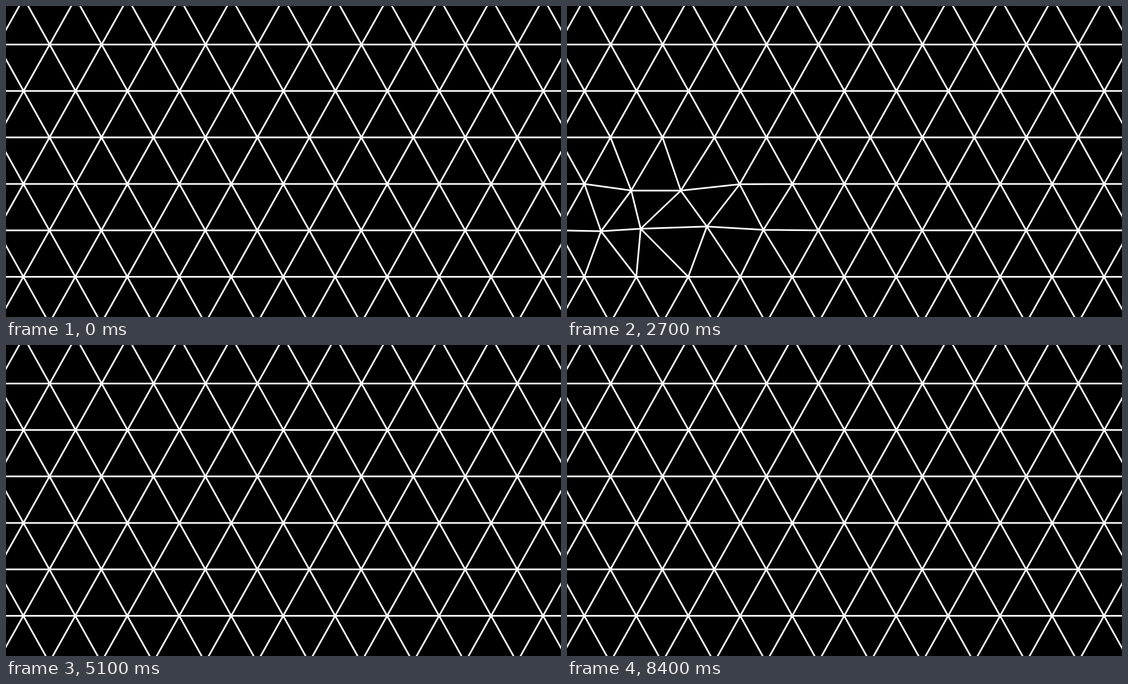
Write an HTML page with a canvas that moves like this. It is 999 px wide and 561 px high and loops after 8.5 s.

```html
<!DOCTYPE html>
<html>
<head>
<meta charset="utf-8">
<style>
  html, body { margin: 0; width: 100%; height: 100%; overflow: hidden; background: #000; }
  canvas { display: block; }
</style>
</head>
<body>
<canvas id="stage" width="999" height="561"></canvas>
<script>
const ctx = document.getElementById('stage').getContext('2d');
const LOOP = 8500, STEP = 100;
const ROWS = 6, COLS = 11;
const REACH = 80, GAIN = 50;
const RISE = 150, FALL = 800;

// An unseen pointer crosses the net in short strokes.
const strokes = [
  { from: 150, to: 750, path: [[840, 420], [650, 450], [650, 580]] },
  { from: 1150, to: 1620, path: [[330, 520], [330, 430], [380, 390], [408, 290]] },
  { from: 2120, to: 2620, path: [[350, 410], [220, 375], [110, 395]] },
  { from: 3800, to: 4280, path: [[452, 320], [465, 240], [480, 160], [440, 85]] },
  { from: 5130, to: 5350, path: [[520, 215], [570, 320], [615, 400]] },
  { from: 5930, to: 6220, path: [[690, 300], [740, 170], [720, 80]] },
  { from: 7230, to: 7520, path: [[230, 230], [110, 150], [100, 90]] }
];

// Splits a stroke into short steps of position, direction and time.
function sample({ from, to, path }) {
  const steps = [];
  for (let i = 1; i < path.length; i++) {
    const [x0, y0] = path[i - 1];
    const dx = path[i][0] - x0, dy = path[i][1] - y0;
    const length = Math.hypot(dx, dy);
    for (let s = 0; s < length; s += 4) {
      const k = s / length;
      steps.push({ x: x0 + dx * k, y: y0 + dy * k, dirX: dx / length, dirY: dy / length });
    }
  }
  steps.forEach((step, i) => step.time = from + (to - from) * i / steps.length);
  return steps;
}

// The pull a vertex gets where the pointer passes closest to it:
// along the stroke, and sideways towards it.
function pullOn(vertex, steps) {
  const distance = step => Math.hypot(step.x - vertex.x, step.y - vertex.y);
  const near = steps.reduce((a, b) => distance(b) < distance(a) ? b : a);
  const size = GAIN * Math.max(0, 1 - (distance(near) / REACH) ** 2);
  return {
    time: near.time,
    size,
    dx: size * (near.dirX + (near.x - vertex.x) / REACH),
    dy: size * (near.dirY + (near.y - vertex.y) / REACH)
  };
}

function strength(age) {
  if (age <= 0 || age >= RISE + FALL) return 0;
  if (age < RISE) return Math.sin(age / RISE * Math.PI / 2);
  return (1 - (age - RISE) / FALL) ** 3;
}

const sampled = strokes.map(sample);
const net = [];
for (let row = 0; row <= ROWS + 1; row++) {
  net[row] = [];
  for (let col = 0; col <= COLS + 2; col++) {
    const vertex = {
      x: -155.2 + 93.55 * col + (row % 2 ? 46.8 : 0) - 0.12 * row,
      y: -14.3 + 83.8 * row
    };
    vertex.pulls = sampled.map(steps => pullOn(vertex, steps)).filter(pull => pull.size > 0);
    net[row][col] = vertex;
  }
}

function pose(vertex, time) {
  let { x, y } = vertex;
  for (const pull of vertex.pulls) {
    const amount = strength(time - pull.time);
    x += pull.dx * amount;
    y += pull.dy * amount;
  }
  return { x, y };
}

function edge(a, b) {
  ctx.moveTo(a.x, a.y);
  ctx.lineTo(b.x, b.y);
}

function draw(time) {
  const grid = net.map(row => row.map(vertex => pose(vertex, time)));
  ctx.fillStyle = '#000';
  ctx.fillRect(0, 0, 999, 561);
  ctx.strokeStyle = '#fff';
  ctx.lineWidth = 3;
  ctx.lineCap = 'round';
  ctx.beginPath();
  for (let row = 0; row <= ROWS; row++) {
    const shift = row % 2;
    for (let col = 1; col <= COLS + 1; col++) {
      const point = grid[row][col];
      edge(point, grid[row][col + 1]);
      edge(point, grid[row + 1][col + shift]);
      edge(point, grid[row + 1][col + shift - 1]);
    }
  }
  ctx.stroke();
}

const start = performance.now();
function tick() {
  const elapsed = (performance.now() - start) % LOOP;
  draw(Math.floor(elapsed / STEP) * STEP);
  requestAnimationFrame(tick);
}
tick();
</script>
</body>
</html>
```
